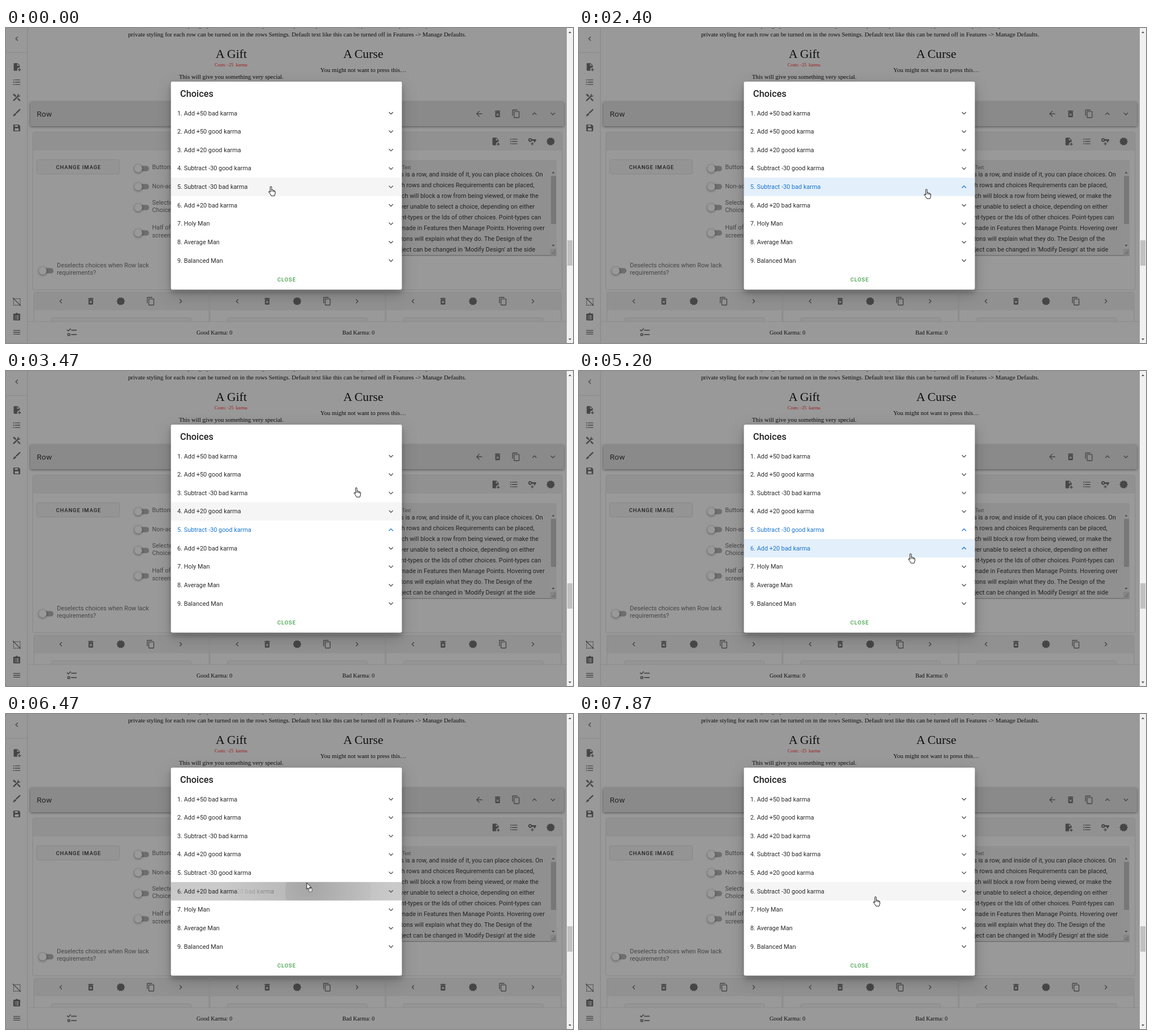
Recreate the animation shown at these times as an HTML page. Size 1003 by 558 pixels, loop 8000 ms.

```html
<!DOCTYPE html>
<html lang="en">
<head>
<meta charset="utf-8">
<title>Choices</title>
<style>
html, body { margin: 0; width: 100%; height: 100%; overflow: hidden; background: #999; }
svg { display: block; width: 100vw; height: 100vh; font: 10.88px Roboto, sans-serif; }
text { white-space: pre; }
.serif { font-family: "Liberation Serif", serif; fill: #0f0f0f; }
.btn { font-size: 9.52px; font-weight: 500; letter-spacing: .85px; }
.icons { fill: #464646; }
.line { fill: none; stroke: #464646; stroke-width: 1.3; }
.shade { filter: drop-shadow(0 1px 2px #0007); }
.soft { filter: drop-shadow(0 .7px .8px #0004); }
.float { filter: drop-shadow(0 5px 4px #0003) drop-shadow(0 8px 13px #0003); }
</style>
</head>
<body>
<svg viewBox="0 0 1003 558">
  <defs>
    <radialGradient id="fade" gradientUnits="userSpaceOnUse" cx="0" cy="-5" r="150">
      <stop offset="0" stop-color="#fff" stop-opacity=".85"/>
      <stop offset="1" stop-color="#fff" stop-opacity="0"/>
    </radialGradient>
    <mask id="halo" maskUnits="userSpaceOnUse" x="-150" y="-155" width="300" height="300">
      <circle cy="-5" r="150" fill="url(#fade)"/>
    </mask>
    <clipPath id="rowClip"><rect x="292" width="408" height="32.64"/></clipPath>
  </defs>
  <g id="page"></g>
  <g id="dialog">
    <rect x="291.7" y="95" width="408.6" height="368.5" rx="2.7" fill="#fff" class="float"/>
    <text x="308" y="122.3" font-size="16.32" font-weight="500" fill="#212121">Choices</text>
    <text x="496.4" y="449.3" class="btn" text-anchor="middle" fill="#43a047">CLOSE</text>
  </g>
  <g id="live"></g>
</svg>
<script>
const PERIOD = 8000, TOP = 134.5, PITCH = 32.64;
const $ = id => document.getElementById(id);

const dot = y => `M4 ${y - 1.5}a1.5 1.5 0 0 1 0 3a1.5 1.5 0 0 1 0-3z`;
const PATHS = {
  down: 'M7.41 8.58L12 13.17 16.59 8.58 18 10 12 16 6 10z',
  up: 'M7.41 15.41L12 10.83 16.59 15.41 18 14 12 8 6 14z',
  left: 'M15.41 16.58L10.83 12 15.41 7.41 14 6 8 12 14 18z',
  right: 'M8.59 16.58L13.17 12 8.59 7.41 10 6 16 12 10 18z',
  back: 'M20 11V13H8L13.5 18.5 12.08 19.92 4.16 12 12.08 4.08 13.5 5.5 8 11z',
  bin: 'M6 19A2 2 0 0 0 8 21H16A2 2 0 0 0 18 19V7H6zM8.46 11.88L9.87 10.47 12 12.59 14.12 10.47 15.53 11.88 13.41 14 15.53 16.12 14.12 17.53 12 15.41 9.88 17.53 8.47 16.12 10.59 14zM15.5 4L14.5 3H9.5L8.5 4H5V6H19V4z',
  copy: 'M19 21H8V7H19zM19 5H8A2 2 0 0 0 6 7V21A2 2 0 0 0 8 23H19A2 2 0 0 0 21 21V7A2 2 0 0 0 19 5M16 1H4A2 2 0 0 0 2 3V17H4V3H16z',
  list: 'M7 5H21V7H7zM7 11H21V13H7zM7 17H21V19H7z' + dot(6) + dot(12) + dot(18),
  file: 'M14 2H6A2 2 0 0 0 4 4V20A2 2 0 0 0 6 22H13.81A6 6 0 0 1 20 13.08V8zM13 9V3.5L18.5 9zM23 20H20V23H18V20H15V18H18V15H20V18H23z',
  menu: 'M3 6H21V8H3zM3 11H21V13H3zM3 16H21V18H3z',
  brush: 'M21.5 2.5Q20 2 18.5 3L9 12 11.5 14.5 21 5.500Q22 4 21.500 2.500M8 13L4.500 16 2 22 8 19.500 11 16z',
  save: 'M17 3H5A2 2 0 0 0 3 5V19A2 2 0 0 0 5 21H19A2 2 0 0 0 21 19V7zM7 5H15V9H7zM7 13H17V19H7z',
  tools: 'M2 5L5 2 11 8 8.5 11zM13 15.5L15.5 13 22 19.5 19.5 22zM2 19.5L14 7.5Q13 3 18 2L16 5 19 8 22 6Q21 11 16.5 10L4.5 22z',
  badge: 'M23 12L20.56 9.22 20.9 5.54 17.29 4.72 15.4 1.54 12 3 8.6 1.54 6.71 4.72 3.1 5.53 3.44 9.21 1 12 3.44 14.78 3.1 18.47 6.71 19.29 8.6 22.47 12 21 15.4 22.46 17.29 19.28 20.9 18.46 20.56 14.78z',
  key: 'M6.5 3a5 5 0 1 0 4.6 7H16V14H20V10H22V6H11.1A5 5 0 0 0 6.5 3M6.5 6a2 2 0 0 1 0 4a2 2 0 0 1 0-4M11 14H13V17H16V19H13V22H11V19H8V17H11z',
  clip: 'M19 3H14.8A3 3 0 0 0 9.2 3H5A2 2 0 0 0 3 5V19A2 2 0 0 0 5 21H19A2 2 0 0 0 21 19V5A2 2 0 0 0 19 3M7 8H9V10H7zM7 12H9V14H7zM7 16H9V18H7zM11 8H17V10H11zM11 12H17V14H11zM11 16H17V18H11z',
  checks: 'M5 10.5L1.5 7 2.9 5.6 5 7.7 9.6 3 11 4.5zM3 14H9V20H3zM5 16V18H7V16zM11 6.5H23V8.5H11zM11 16H23V18H11z'
};
const icon = (name, x, y, fill = '', scale = .68) =>
  `<path transform="translate(${x - 12 * scale} ${y - 12 * scale})scale(${scale})" fill-rule="evenodd" ${fill && `fill="${fill}"`} d="${PATHS[name]}"/>`;
const rect = (x, y, w, h, fill, more = '') => `<rect x="${x}" y="${y}" width="${w}" height="${h}" fill="${fill}" ${more}/>`;
const text = (s, x, y, more = '') => `<text x="${x}" y="${y}" ${more}>${s}</text>`;
const serif = (s, x, y, size = 10.88, more = '') =>
  text(s, x, y, `class="serif" text-anchor="middle" font-size="${size}" ${more}`);
const toggle = (x, y) =>
  rect(x - 10, y - 4.7, 23, 9.5, '#6e6e6e', 'rx="4.7"') + `<circle cx="${x - 6}" cy="${y}" r="6.8" fill="#999" class="shade"/>`;
const label = (s, x, y) => text(s, x, y, 'fill="#464646"');

function page() {
  const notes = ['This is a row, and inside of it, you can place choices. On', 'Both rows and choices Requirements can be placed,',
    'which will block a row from being viewed, or make the', 'player unable to select a choice, depending on either',
    'Point-types or the Ids of other choices. Point-types can', 'be made in Features then Manage Points. Hovering over',
    'buttons will explain what they do. The Design of the', "Project can be changed in 'Modify Design' at the side"];
  const side = { left: 19, file: 69, list: 96, tools: 123, brush: 150, save: 177, clip: 512, menu: 539 };
  let h = serif('This is a paragraph of text that shows up above every choice placed in the row, private and simple, and any', 515, -1.3) +
    serif('private styling for each row can be turned on in the rows Settings. Default text like this can be turned off in Features -&gt; Manage Defaults.', 515, 15) +
    serif('A Gift', 398.5, 53, 21.76) + serif('Costs: -25  karma', 398, 67.6, 8.16, 'style="fill:#a01c1c"') +
    serif('This will give you something very special.', 398.5, 90) +
    serif('A Curse', 632, 53, 21.76) + serif('You might not want to press this…', 632, 78);
  // row header and settings card
  h += rect(43, 131, 944, 43, '#8a8a8a', 'rx="2" class="shade"') +
    text('Row', 54.5, 156.8, 'font-size="13.6" letter-spacing=".17" fill="#222"') +
    rect(48, 185, 935, 278, '#999', 'rx="2" class="soft"') + rect(48, 185, 935, 32, '#919191') +
    rect(55, 234, 145, 24, '#949494', 'rx="2" class="soft"') +
    text('CHANGE IMAGE', 128.4, 249.6, 'class="btn" text-anchor="middle" fill="#222"');
  h += toggle(240, 249) + label('Buttons', 258.5, 250) + toggle(240, 281) + label('Non-active', 258.5, 284.4) +
    toggle(240, 318) + label('Selected', 258.5, 312.5) + label('Choices', 258.5, 326) +
    toggle(240, 363) + label('Half of', 258.5, 357.3) + label('screen?', 258.5, 371) +
    toggle(71, 430) + label('Deselects choices when Row lack', 90, 423.6) + label('requirements?', 90, 437.2);
  h += rect(674, 234, 300, 169, '#909090', 'rx="2"') + rect(674, 402.5, 300, 1, '#5f5f5f') +
    text('Row Text', 683, 250, 'font-size="8.16" fill="#464646"') +
    notes.map((s, i) => text(s, 683, 263 + i * 19.04, 'fill="#222"')).join('') +
    rect(963, 250, 11, 141, '#919191') + rect(964, 262, 9, 85, '#777') + rect(963, 391, 11, 12, '#858585') +
    '<path d="M965.5 257.5h5l-2.5-3zM965.5 384h5l-2.5 3z" fill="#444"/><path d="M965 401l7-7M969 401l3-3" stroke="#555"/>';
  // lower cards and footer
  [50, 361.5, 673].forEach(x => {
    h += rect(x, 469, 308.5, 80, '#999', 'class="soft"') + rect(x, 469, 308.5, 31, '#919191') +
      rect(x + 31, 514, 246, 30, '#959595', 'rx="3" class="soft"');
  });
  h += rect(38, 520, 954, 38, '#999') + rect(38, 519.5, 954, 1, '#8b8b8b') +
    text('Good Karma: 0', 337, 543, 'class="serif" font-size="10.2"') + text('Bad Karma: 0', 595, 543, 'class="serif" font-size="10.2"') +
    rect(0, 0, 38, 558, '#999') + rect(37.5, 0, 1, 558, '#868686') + rect(0, 43, 38, 1, '#8b8b8b');
  h += '<g class="icons">';
  for (const name in side) h += icon(name, 19, side[name]);
  ['back', 'bin', 'copy', 'up', 'down'].forEach((n, i) => h += icon(n, 837 + i * 32.6, 152));
  ['file', 'list', 'key', 'badge'].forEach((n, i) => h += icon(n, 866 + i * 32.5, 201));
  [97, 409, 720].forEach(x => ['left', 'bin', 'badge', 'copy', 'right'].forEach((n, i) => h += icon(n, x + i * 53, 484)));
  h += icon('checks', 116, 539, '', .816);
  h += '</g><g class="line"><path d="M13.5 479.5H25V491H13.5z" stroke-dasharray="2 1.3"/><path d="M12 478L26 492"/></g>';
  return h + rect(992, 0, 11, 558, '#f1f1f1') + rect(993, 376, 9, 45, '#c1c1c1') +
    '<path d="M995 9h5l-2.5-3zM995 550h5l-2.5 3z" fill="#505050"/>';
}

// list state: time, item order, shown numbers, open rows, focused row, its colour
const ITEMS = ['Add +50 bad karma', 'Add +50 good karma', 'Add +20 good karma', 'Subtract -30 good karma',
  'Subtract -30 bad karma', 'Add +20 bad karma', 'Holy Man', 'Average Man', 'Balanced Man'];
const BLUE = '#e3effa', GREY = '#ededed', DARK = '#cacaca', PLAIN = '123456789';
const STATES = [
  [0, '012345678', PLAIN, '', -1],
  [1800, '012345678', PLAIN, '4', 4, BLUE],
  [2950, '012435678', '123546789', '3', 3, BLUE],
  [3200, '014235678', '125346789', '2', 2, BLUE],
  [3400, '014235678', '125346789', '2', -1],
  [3470, '014235678', PLAIN, '4', -1],
  [4530, '014235678', PLAIN, '45', 5, BLUE],
  [5400, '014235678', PLAIN, '4', 5, GREY],
  [5900, '014235678', PLAIN, '', 4, GREY],
  [6200, '014235678', PLAIN, '', 5, DARK],
  [6600, '014253678', '123465789', '', 4, DARK],
  [6730, '014523678', '123645789', '', 3, DARK],
  [6840, '015423678', '126345789', '', 2, DARK],
  [6930, '015423678', '126345789', '', -1],
  [7130, '015423678', PLAIN, '', -1]
];
// pointer: time, x, y
const MOVES = [[0, 470, 289], [600, 470, 289], [1000, 572, 272], [1400, 680, 289], [1530, 680, 290.5], [2070, 680, 290.5],
  [2400, 616, 294], [2600, 616, 294], [3400, 620, 213], [3470, 621, 215], [3900, 598, 359], [4270, 563, 340],
  [4330, 563, 335], [4530, 563, 335], [5200, 588, 332], [5400, 588, 332], [5670, 537, 292], [5900, 503, 289], [6200, 469, 308],
  [6270, 469, 308], [6470, 534, 308], [6930, 548, 221], [7130, 548, 221], [7400, 663, 262], [7730, 526, 332], [PERIOD, 526, 332]];
// ripples: time, x, row, colour
const RIPPLES = [[1800, 680, 4, '#1976d2'], [4530, 563, 5, '#1976d2'], [5400, 588, 5, '#222'], [5900, 503, 4, '#222']];
const DRAGS = [
  { from: 2600, to: 3400, x: 616, y: 294, row: 4, item: '5. Subtract -30 bad karma', ink: '#1976d2', back: '#a9cdee', spot: 640, chevron: 'up' },
  { from: 6270, to: 6930, x: 469, y: 308, row: 5, item: '6. Add +20 bad karma', ink: '#333', back: '#b0b0b0', spot: 505, chevron: 'down' }
];

function pointer(t) {
  const i = MOVES.findIndex(m => m[0] > t), [t0, x0, y0] = MOVES[i - 1], [t1, x1, y1] = MOVES[i];
  const p = (t - t0) / (t1 - t0), e = p * p * (3 - 2 * p);
  return [x0 + (x1 - x0) * e, y0 + (y1 - y0) * e];
}

const rowText = (s, y, ink, chevron) => text(s, 303, y + 20, `fill="${ink}"`) + icon(chevron, 681, y + 16.3, ink === '#1976d2' ? ink : '#555');
const blot = (top, x, r, ink, alpha) =>
  `<g transform="translate(0 ${top})" clip-path="url(#rowClip)"><circle cx="${x}" cy="16.3" r="${r}" fill="${ink}" opacity="${alpha}"/></g>`;

function ghost(d, x, y) {
  const top = TOP + d.row * PITCH;
  return `<g transform="translate(${x} ${y})" mask="url(#halo)"><g transform="translate(${-d.x} ${-d.y})">` +
    rect(292, top, 408, PITCH, d.back) + blot(top, d.spot, 76, '#000', .1) +
    rowText(d.item, top, d.ink, d.chevron) + '</g></g>';
}

const HAND = '<path d="M3.3 11V2q0-1.4 1.3-1.4T5.9 2v4.6q2.4-.4 2.6.9 1.8-.3 2 .8 1.7 0 1.7 1.4v3.3l-1.3 4.3H5.2L3.2 13.8.8 10.8q-.4-1.4.9-1.5 1 0 1.6 1.7zM5.9 6.6v3.4M8.5 7.5v2.7M10.5 8.3v2.2" fill="#fff" stroke="#000" stroke-width=".9" stroke-linejoin="round"/>';
const ARROW = '<path d="M0 0V11.5l2.6-2.4 1.8 4 1.8-.8-1.7-3.9h3.6z" fill="#fff" stroke="#000" stroke-width=".9"/><rect x="3.5" y="10" width="6" height="6" rx="1" fill="#ddd" stroke="#333" stroke-width=".9" stroke-dasharray="1.5 .7"/>';

function live(t) {
  const [x, y] = pointer(t), drag = DRAGS.find(d => t >= d.from && t < d.to);
  const [, order, nums, open, focus, tint] = STATES.filter(s => s[0] <= t).pop();
  let hover = drag ? -1 : Math.floor((y - 9 - TOP) / PITCH);
  if (t >= 3400 && t < 3530) hover = 3;   // hover stays behind until the pointer moves again
  let h = '';
  [...order].forEach((item, i) => {
    const top = TOP + i * PITCH, on = open.includes(i);
    if (i === focus) h += rect(292, top, 408, PITCH, tint);
    else if (i === hover) h += rect(292, top, 408, PITCH, on ? '#fbfdff' : '#f5f5f5');
    for (const [start, rx, row, ink] of RIPPLES) {
      const p = (t - start) / 130;
      if (row !== i || p < 0 || p >= 2) continue;
      const e = 1 - (1 - Math.min(1, p)) ** 2;
      h += blot(top, rx + (496 - rx) * e, 60 + 150 * e, ink, .2 * Math.min(1, 2 - p));
    }
    h += rowText(`${nums[i]}. ${ITEMS[item]}`, top, on ? '#1976d2' : '#2b2b2b', on ? 'up' : 'down');
  });
  if (drag) h += ghost(drag, x, y);
  return h + (drag ? `<g transform="translate(${x - 2} ${y - 9})">${ARROW}` : `<g transform="translate(${x - 6} ${y - 9})">${HAND}`) + '</g>';
}

$('page').innerHTML = page();
function draw() {
  $('live').innerHTML = live(performance.now() % PERIOD);
  requestAnimationFrame(draw);
}
draw();
</script>
</body>
</html>
```
